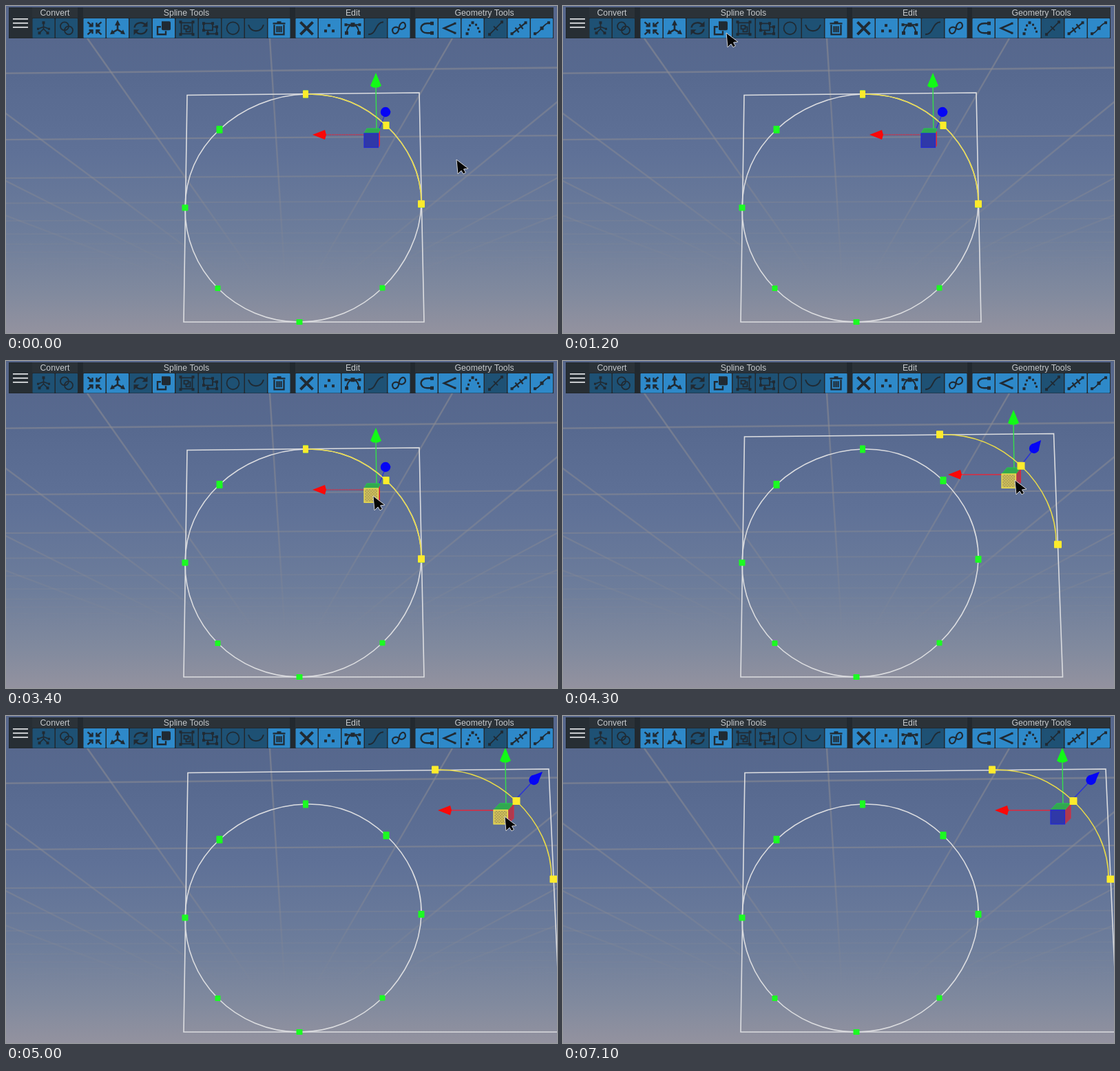
An HTML page with a canvas that plays this animation: 800x475 px, repeating every 7200 ms.

```html
<!DOCTYPE html>
<html lang="en">
<head>
<meta charset="utf-8">
<title>Spline tools</title>
<style>
html, body { margin: 0; width: 100%; height: 100%; overflow: hidden; background: #5a6b92; }
canvas { display: block; width: 800px; height: 475px; }
</style>
</head>
<body>
<canvas id="stage" width="800" height="475"></canvas>
<script>
const LOOP = 7200, STEP = 100, W = 800, H = 475;
const ctx = document.getElementById('stage').getContext('2d');
const FONT = '"Liberation Sans", Arial, sans-serif';
const WHITE = '#dcdde0', YELLOW = '#fdeb2c', GREEN = '#1cfb22', INK = '#202a33';

// ---- small drawing helpers ----
function poly(points, fill, stroke, width = 1) {
  ctx.beginPath();
  points.forEach(([x, y]) => ctx.lineTo(x, y));
  ctx.closePath();
  if (fill) { ctx.fillStyle = fill; ctx.fill(); }
  if (stroke) { ctx.strokeStyle = stroke; ctx.lineWidth = width; ctx.stroke(); }
}
function line(x1, y1, x2, y2, color, width) {
  ctx.beginPath();
  ctx.moveTo(x1, y1);
  ctx.lineTo(x2, y2);
  ctx.strokeStyle = color;
  ctx.lineWidth = width;
  ctx.stroke();
}
function box(x, y, w, h, color, r = 0) {
  ctx.beginPath();
  ctx.roundRect(x, y, w, h, r);
  ctx.fillStyle = color;
  ctx.fill();
}
function label(text, x, y, size, color) {
  ctx.font = `${size}px ${FONT}`;
  ctx.textAlign = 'center';
  ctx.fillStyle = color;
  ctx.fillText(text, x, y);
}
const handle = (x, y, w, h, color) => box(x - w / 2, y - h / 2, w, h, color, 0.8);
const mix = (a, b, k) => a + (b - a) * k;
const clamp = k => Math.min(1, Math.max(0, k));

// ---- toolbar icons: [stroke path, fill path, line width], centred on 0,0 ----
const dot = (x, y, s = 4) => `M${x - s / 2} ${y - s / 2}h${s}v${s}h${-s}z`;
const dots = (...pts) => pts.map(p => dot(...p)).join('');
const inward = [[1, 1], [1, -1], [-1, 1], [-1, -1]]
  .map(([a, b]) => `M${10 * a} ${9 * b}L${3 * a} ${3 * b}M${3 * a} ${8 * b}V${3 * b}H${8 * a}`).join('');
const frame = 'M-8-8H8V8H-8Z';

const convertIcons = [
  ['M0-7V1M0-2L-8 1M0-2L8 1M0 1L-6 7M0 1L6 7', dots([0, -8, 4], [-8, 1, 3], [8, 1, 3], [-6, 7], [6, 7]), 1.6],
  ['M3-3A6 6 0 1 1-9-3A6 6 0 1 1 3-3M9 3A6 6 0 1 1-3 3A6 6 0 1 1 9 3', '', 1.8]
];
const splineIcons = [
  [inward, '', 2.4],
  ['M0-6V2L-7 6M0 2L7 6', 'M0-12L4-4H-4ZM-11 9L-8 2L-4 8ZM11 9L8 2L4 8Z', 2.6],
  ['M-9-1A9 8 0 0 1 7-5M9 1A9 8 0 0 1-7 5', 'M10-10V-2H2ZM-10 10V2H-2Z', 2.4],
  ['M-4-2H-9V9H3V4', 'M-3-10H8Q10-10 10-8V1Q10 3 8 3H-1Q-3 3-3 1Z', 2.4],
  [frame + 'M-4-4H2V1H-4ZM-1 1V5H5V-2H2', dots([-9, -9], [9, -9], [-9, 9], [9, 9]), 1.8],
  ['M-9-7H4V3H-9ZM4-2H10V8H-3V3', dots([-9, -7], [4, -7], [-9, 3], [10, -2], [10, 8], [-3, 8]), 1.8],
  ['M9 0A9 9 0 1 1-9 0A9 9 0 1 1 9 0', '', 1.7],
  ['M-11-5C-7 7 7 7 11-5', '', 2],
  ['M-9-7H9M-3-9H3M-7-5V9H7V-5M-3-3V6M0-3V6M3-3V6', '', 2.3]
];
const editIcons = [
  ['M-9-9L9 9M9-9L-9 9', '', 4],
  ['', dots([-1, -4], [-6, 4], [5, 4]), 0],
  ['M-9 7C-8-1-5-5 0-5S8-1 9 7M-10-5H10', dots([0, -5, 6], [-10, -5], [10, -5], [-9, 7, 5], [9, 7, 5]), 2],
  ['M-11 9C2 9-2-8 11-9', '', 1.9],
  ['M0 0C-5-4-11 0-9 5C-7 10-1 8 0 0C1-8 7-11 9-6C11-1 5 4 0 0', '', 2.2]
];
const geometryIcons = [
  ['M7-7H1C-11-7-11 7 1 7H7', dots([8, -7, 5], [8, 7, 5]), 2.4],
  ['M8-7L-8 0L8 7', dots([8, -7, 3], [8, 7, 3]), 2.6],
  ['', dots([-8, 8], [-6, 2, 3], [-4, -4, 3], [0, -8], [5, -5, 3], [8, 0, 3], [10, 5, 3]), 0],
  ['M-9 9L9-9M-3-3L3 3', dots([-9, 9], [9, -9]), 1.8],
  ['M-10 8L10-8M-5-1L0 6M1-6L6 1', dots([-10, 8], [10, -8]), 2.2],
  ['M-10 8C-2 7 1-6 10-8', dots([-10, 8], [0, 0, 5], [10, -8]), 1.8]
];
// name, left edge, right edge, icons, enabled flags
const groups = [
  ['Convert', 38, 104, convertIcons, '00'],
  ['Spline Tools', 112, 412, splineIcons, '110100001'],
  ['Edit', 420, 587, editIcons, '11101'],
  ['Geometry Tools', 594, 795, geometryIcons, '111011']
];

function drawIcon([stroke, fill, width], x, y) {
  ctx.save();
  ctx.translate(x, y);
  ctx.strokeStyle = ctx.fillStyle = INK;
  ctx.lineWidth = width;
  if (stroke) ctx.stroke(new Path2D(stroke));
  if (fill) ctx.fill(new Path2D(fill));
  ctx.restore();
}
function drawToolbar() {
  box(4, 2, 791, 45, '#22292f');
  box(5, 3, 33, 43, '#272e34');
  for (let i = 0; i < 3; i++) box(10, 18 + i * 6, 22, 1.7, '#e4e6e8');
  for (const [name, left, right, icons, on] of groups) {
    box(left, 2, right - left, 15, '#2b3238');
    label(name, (left + right) / 2, 14, 12.3, '#c5c9cc');
    icons.forEach((icon, i) => {
      const x = left + i * 33.5;
      box(x + 0.5, 18, 32, 28.5, on[i] === '1' ? '#2e89c9' : '#1e5174', 1);
      drawIcon(icon, x + 16.5, 32.3);
    });
  }
}

// ---- backdrop ----
function drawBackdrop() {
  const sky = ctx.createLinearGradient(0, 0, 0, H);
  [[0, '#56668b'], [0.2, '#57698f'], [0.45, '#5f7197'], [0.7, '#6d7d9b'], [0.88, '#818a9e'], [1, '#93929f']]
    .forEach(stop => sky.addColorStop(...stop));
  ctx.fillStyle = sky;
  ctx.fillRect(0, 0, W, H);

  const horizon = 460, vanishX = 409;
  for (let k = 0; k < 11; k++) {
    const depth = 1000 / (2.73 + 0.99 * k), y = horizon - depth, tilt = depth * 0.011;
    line(0, y + tilt, W, y - tilt, `rgba(140,140,146,${0.56 * clamp((depth - 70) / 190)})`, 1.4 + depth / 300);
  }
  const fade = ctx.createLinearGradient(0, 47, 0, 400);
  fade.addColorStop(0, 'rgba(140,140,146,.58)');
  fade.addColorStop(0.6, 'rgba(140,140,146,.42)');
  fade.addColorStop(1, 'rgba(140,140,146,0)');
  for (let k = -4; k <= 4; k++) line(383 + k * 265, 47, vanishX, horizon, fade, 2.4);
}

// ---- spline ----
// x, y, handle width, handle height
const knots = [
  [435, 128, 8, 11], [552, 173.5, 9, 11], [603, 288, 9, 10], [546.5, 409.5, 8, 8],
  [426, 459, 9, 8], [307.5, 410, 8, 8], [260, 293, 9, 9], [310, 179.5, 9, 11]
];
const knot = i => knots[(i + 8) % 8];
// Bezier handle lengths of a circle cut in eighths
const tangent = (i, axis) => (knot(i + 1)[axis] - knot(i - 1)[axis]) * 0.1875;

function drawCurve(first, count, color, width, dx = 0, dy = 0) {
  ctx.save();
  ctx.translate(dx, dy);
  ctx.beginPath();
  ctx.moveTo(...knot(first).slice(0, 2));
  for (let i = first; i < first + count; i++) {
    const [ax, ay] = knot(i), [bx, by] = knot(i + 1);
    ctx.bezierCurveTo(ax + tangent(i, 0), ay + tangent(i, 1),
      bx - tangent(i + 1, 0), by - tangent(i + 1, 1), bx, by);
  }
  ctx.strokeStyle = color;
  ctx.lineWidth = width;
  ctx.stroke();
  ctx.restore();
}

// Each part at drag start, midway and end: [x, y] per pose
const poses = {
  arc: [[0, 0], [113, -21.3], [189, -50]],
  right: [[603, 287.5], [718.5, 266.5], [795, 237]],
  cube: [[520, 185], [637, 164], [708, 136.5]],
  depth: [[4, -7], [8, -9], [9, -9.5]],
  side: [[2, -3], [7, -8], [8.5, -8.5]],
  up: [[537, 97], [654, 71], [725, 46]],
  red: [[445, 187], [559, 165], [627, 137]],
  ball: [[552, 153], [685, 126], [767.5, 92]],
  tip: [[553, 147], [694, 115], [779, 81]],
  topLeft: [[263, 129.5], [263.5, 110], [264, 82.5]],
  topRight: [[600, 126], [712.5, 105.5], [788, 77]],
  bottomRight: [[607, 459], [725.5, 459], [805, 459]]
};
function at(name, drag) {
  const i = drag < 1 ? 0 : 1, [a, b] = [poses[name][i], poses[name][i + 1]];
  return [mix(a[0], b[0], drag - i), mix(a[1], b[1], drag - i)];
}

function drawGizmo(drag, hover) {
  const [cx, cy] = at('cube', drag), [dx, dy] = at('depth', drag), [sx, sy] = at('side', drag);
  const [ux, uy] = at('up', drag), [rx, ry] = at('red', drag);
  const [bx, by] = at('ball', drag), [tx, ty] = at('tip', drag);
  const s = 20.5;

  line(cx + 18, cy - 4, ux, uy + 18, '#35e04a', 1.4);
  poly([[ux, uy], [ux + 8, uy + 19], [ux + 3, uy + 21.5], [ux - 4, uy + 21.5], [ux - 8, uy + 19]], '#12fa16');

  ctx.setLineDash(drag < 0.3 ? [1.5, 1] : []);
  line(rx + 18, ry, cx + s, ry, '#e0283c', 1.3);
  ctx.setLineDash([]);
  poly([[rx, ry], [rx + 18, ry - 7], [rx + 20, ry], [rx + 18, ry + 7]], '#fb0808');

  line(cx + s, cy - 3, bx, by, '#2932d8', 1.4);
  ctx.fillStyle = '#0505f5';
  ctx.beginPath();
  ctx.arc(bx - 1, by + 1, 7.2, 0, Math.PI * 2);
  ctx.fill();
  const a = Math.atan2(ty - by, tx - bx), nx = -Math.sin(a) * 7, ny = Math.cos(a) * 7;
  poly([[tx, ty], [bx + nx, by + ny], [bx - nx, by - ny]], '#0505f5');

  poly([[cx + s, cy], [cx + s + sx, cy + sy], [cx + s + sx, cy + s + sy], [cx + s, cy + s]],
    'rgba(190,48,66,.85)', '#e0283c');
  poly([[cx, cy], [cx + dx, cy + dy], [cx + s + sx, cy + dy], [cx + s, cy]], '#31a850', '#22cb48');

  if (hover) {
    box(cx, cy, s, s, '#cdbd59');
    ctx.fillStyle = '#887f58';
    for (let j = 0; j < 9; j++)
      for (let i = 0; i < 9; i++)
        if ((i + j) % 2) ctx.fillRect(cx + 1.5 + i * 2, cy + 1.5 + j * 2, 1.2, 1.2);
  } else {
    box(cx, cy, s, s, '#2f38a8');
  }
  ctx.strokeStyle = hover ? '#f2e348' : '#2229d6';
  ctx.lineWidth = 1.2;
  ctx.strokeRect(cx, cy, s, s);
}

function drawScene(drag, hover) {
  poly([[258, 459], at('topLeft', drag), at('topRight', drag), at('bottomRight', drag)], null, WHITE, 1.6);
  drawCurve(0, 8, WHITE, 1.6);
  knots.forEach(k => handle(...k, GREEN));
  drawGizmo(drag, hover);
  const [dx, dy] = at('arc', drag), grow = Math.min(drag, 1) * 2;
  drawCurve(0, 2, '#eadb48', 1.5, dx, dy);
  handle(435 + dx - grow / 2, 128 + dy, 8 + grow, 11, YELLOW);
  handle(552 + dx, 173.5 + dy, 9 + grow, 11, YELLOW);
  handle(...at('right', drag), 10 + grow / 2, 10.5, YELLOW);
}

// ---- pointer ----
// time, x, y
const path = [
  [0, 654, 223], [200, 654, 223], [1100, 237, 39], [1300, 237, 39], [1500, 232, 37],
  [2600, 232, 37], [3300, 533, 196], [3600, 533, 196], [5000, 724, 146], [5400, 724, 146], [6000, 830, 50]
];
const DRAG_START = 3600, DRAG_END = 5000;
const grip = [[533, 196], [656, 173], [724, 146]];
poses.grip = grip;

function pointer(t, drag) {
  if (t >= DRAG_START && t <= DRAG_END) return at('grip', drag);
  const i = path.findIndex(p => p[0] > t);
  if (i < 0) return null;
  const [t0, x0, y0] = path[i - 1], [t1, x1, y1] = path[i];
  const k = (t - t0) / (t1 - t0), e = k * k * (3 - 2 * k);
  return [mix(x0, x1, e), mix(y0, y1, e)];
}
function drawPointer([x, y]) {
  ctx.save();
  ctx.translate(x, y);
  poly([[0, 0], [17, 13], [10.5, 14], [13.5, 19], [10, 21], [7, 16], [2, 21]], '#050505', '#d2d4d8', 1);
  ctx.restore();
}
function drawTooltip() {
  box(232, 5, 74, 31, '#2b3238', 3);
  label('Duplicate', 269, 26, 15.4, '#f4f5f6');
}

function render(t) {
  const drag = 2 * clamp((t - DRAG_START) / (DRAG_END - DRAG_START));
  drawBackdrop();
  drawScene(drag, t >= 3200 && t < 5600);
  drawToolbar();
  if (t >= 1600 && t < 2800) drawTooltip();
  const pos = pointer(t, drag);
  if (pos) drawPointer(pos);
}

const start = performance.now();
function tick() {
  const t = (performance.now() - start) % LOOP;
  render(Math.floor(t / STEP) * STEP);
  requestAnimationFrame(tick);
}
tick();
</script>
</body>
</html>
```
